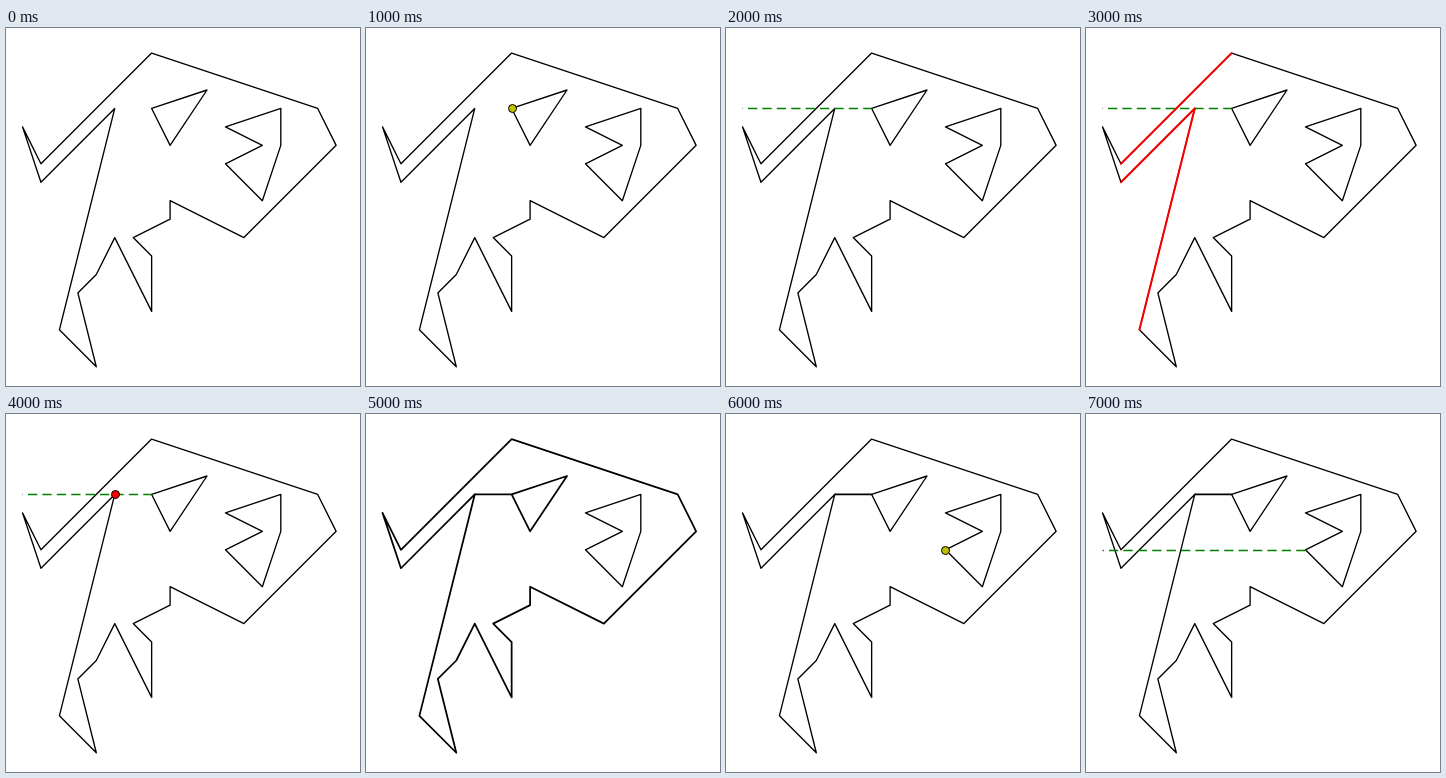
These frames come from a looping animation (354x358 px, 8 s). An HTML page with a canvas:

```html
<!DOCTYPE html>
<html lang="en">
<head>
<meta charset="utf-8">
<title>Joining polygon holes</title>
<style>
  html, body { margin: 0; width: 100%; height: 100%; overflow: hidden; background: #fff; }
  canvas { display: block; }
</style>
</head>
<body>
<canvas id="stage" width="354" height="358"></canvas>
<script>
const ctx = document.getElementById('stage').getContext('2d');
const STEP = 1000, STEPS = 8, LINE = 1.35, DOUBLE = 1.75;
const YELLOW = '#bfbf00', GREEN = '#008000', RED = '#f00';

// Vertices in grid units
const outer = [[0, 4], [1, 6], [7, 0], [16, 3], [17, 5], [12, 10], [8, 8], [8, 9], [6, 10],
  [7, 11], [7, 14], [5, 10], [4, 12], [3, 13], [4, 17], [2, 15], [5, 3], [1, 7]];
const triangle = [[7, 3], [10, 2], [8, 5]];
const notched = [[11, 4], [14, 3], [14, 5], [13, 8], [11, 6], [13, 5]];
const hitEdges = [[[1, 6], [7, 0]], [[5, 3], [2, 15]], [[5, 3], [1, 7]]];
const bridge = [[5, 3], [7, 3]];

const place = ([i, j]) => [16.5 + 18.45 * i, 25.1 + 18.45 * j];
const snap = p => place(p).map(v => Math.round(v) + 0.5);

function path(points, closed, width = LINE, color = '#000') {
  ctx.beginPath();
  points.forEach(p => ctx.lineTo(...place(p)));
  if (closed) ctx.closePath();
  ctx.lineWidth = width;
  ctx.strokeStyle = color;
  ctx.stroke();
}

function dot(p, color) {
  ctx.beginPath();
  ctx.arc(...snap(p), 4, 0, 2 * Math.PI);
  ctx.fillStyle = color;
  ctx.fill();
  ctx.lineWidth = 1;
  ctx.strokeStyle = '#000';
  ctx.stroke();
}

function ray(p) {
  const [x, y] = snap(p);
  ctx.save();
  ctx.lineCap = 'butt';
  ctx.setLineDash([9.3, 5.1]);
  ctx.beginPath();
  ctx.moveTo(x, y);
  ctx.lineTo(16.5, y);
  ctx.lineWidth = LINE;
  ctx.strokeStyle = GREEN;
  ctx.stroke();
  ctx.restore();
}

function draw(step) {
  ctx.fillStyle = '#fff';
  ctx.fillRect(0, 0, 354, 358);
  ctx.lineJoin = ctx.lineCap = 'round';

  const width = step === 5 ? DOUBLE : LINE;
  path(outer, true, width);
  path(triangle, true, width);
  path(notched, true);
  if (step >= 5) path(bridge, false, DOUBLE);

  if (step === 1) dot(triangle[0], YELLOW);
  if (step >= 2 && step <= 4) ray(triangle[0]);
  if (step === 3) hitEdges.forEach(edge => path(edge, false, 2, RED));
  if (step === 4) dot(bridge[0], RED);
  if (step === 6) dot(notched[4], YELLOW);
  if (step === 7) ray(notched[4]);
}

const start = performance.now();
function tick() {
  draw(Math.floor((performance.now() - start) / STEP) % STEPS);
  requestAnimationFrame(tick);
}
tick();
</script>
</body>
</html>
```
